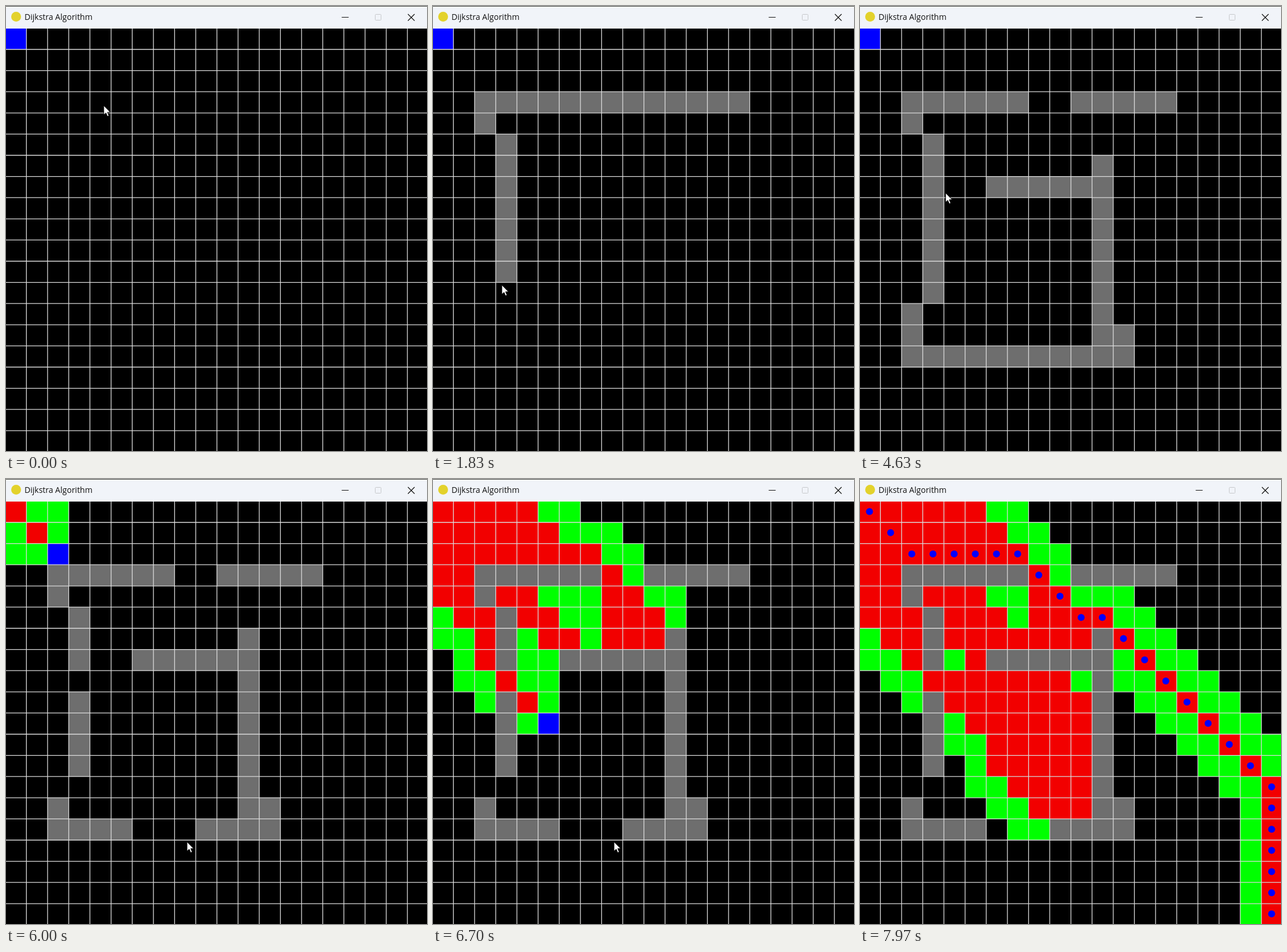
These frames come from a looping animation (728 px wide and 769 px high, 8 s). An HTML page with a canvas:

```html
<!DOCTYPE html>
<html lang="en">
<head>
<meta charset="utf-8">
<title>Dijkstra Algorithm</title>
<style>
  html, body { margin: 0; width: 100%; height: 100%; overflow: hidden; background: #000; }
  canvas, svg { position: absolute; left: 0; top: 0; display: block; }
  text { font: 14px "Open Sans", "Noto Sans", sans-serif; fill: #111; }
</style>
</head>
<body>
<canvas id="board" width="728" height="769"></canvas>
<svg width="728" height="39" viewBox="0 0 728 39" fill="none">
  <rect width="728" height="39" fill="#f1f4f9"/>
  <rect width="728" height="1" fill="#4a4a42"/>
  <circle cx="17.5" cy="18.5" r="8.5" fill="#e3d22c"/>
  <text x="32" y="24">Dijkstra Algorithm</text>
  <path d="M580.5 19.5h12" stroke="#111"/>
  <rect x="638.5" y="14.5" width="10" height="10" rx="1" stroke="#c6c8cb"/>
  <path d="M695 14l11.5 11.5M706.5 14l-11.5 11.5" stroke="#111" stroke-width="1.2"/>
</svg>
<script>
const LOOP = 8000, FRAME = 100 / 3, N = 20, CELL = 36.6, LEFT = -1.3, TOP = 38.4;
const SEARCH_START = 6000 - FRAME, STEP = FRAME / 2, INPUT_LAG = 20;
const ctx = document.getElementById('board').getContext('2d');
const colour = { wall: '#6e6e6e', open: '#00ff00', closed: '#f20000', current: '#0000ff', line: '#dcdcdc' };

// Pointer route: time, x, y, and what the button does on the way there.
const route = [
  [0, 169, 172], [550, 535, 168], [620, 535, 168],
  [1250, 90, 168, 'draw'], [1350, 92, 205, 'draw'], [1430, 122, 240],
  [1833, 119, 482, 'draw'], [1900, 122, 500, 'draw'], [1980, 90, 535],
  [2100, 88, 605, 'draw'], [2480, 455, 608, 'draw'], [2560, 455, 570, 'draw'],
  [2610, 420, 568, 'draw'], [2910, 420, 275, 'draw'], [3000, 411, 296, 'draw'],
  [3100, 405, 312, 'draw'], [3350, 235, 315, 'draw'], [3500, 235, 315],
  [3850, 310, 165], [4000, 345, 168, 'erase'], [4100, 345, 168],
  [4633, 148, 323], [4760, 127, 345], [4840, 127, 348, 'erase'],
  [5150, 92, 530], [5230, 92, 533, 'erase'], [5480, 235, 602],
  [5650, 310, 608, 'erase'], [5750, 313, 627], [7650, 313, 627], [7850, 318, 790]
];

const xOf = col => LEFT + col * CELL;
const yOf = row => TOP + row * CELL;
const cellAt = ([x, y]) => Math.floor((y - TOP) / CELL) * N + Math.floor((x - LEFT) / CELL);

function between(a, b, t) {
  const k = Math.min(1, (t - a[0]) / (b[0] - a[0]));
  return [a[1] + (b[1] - a[1]) * k, a[2] + (b[2] - a[2]) * k];
}

function pointerAt(t) {
  let i = 1;
  while (i < route.length - 1 && route[i][0] < t) i++;
  return between(route[i - 1], route[i], t);
}

function recordEdits() {
  const edits = [], walls = new Set();
  for (let i = 1; i < route.length; i++) {
    const [a, b] = [route[i - 1], route[i]];
    if (!b[3]) continue;
    const add = b[3] === 'draw';
    for (let t = a[0]; t <= b[0]; t += 4) {
      const cell = cellAt(between(a, b, t));
      if (walls.has(cell) === add) continue;
      add ? walls.add(cell) : walls.delete(cell);
      edits.push({ time: t + INPUT_LAG, cell, add });
    }
  }
  return { edits, walls };
}

// Best-first search with octile distance; ties go to the cell nearer the goal.
function search(walls) {
  const goal = N * N - 1, order = [], nodes = new Map(), open = [];
  const distance = cell => {
    const dx = N - 1 - cell % N, dy = N - 1 - Math.floor(cell / N);
    return 1000 * Math.max(dx, dy) + 414 * Math.min(dx, dy);
  };
  const visit = (cell, g, parent) => {
    let node = nodes.get(cell);
    if (!node) {
      node = { cell, g: Infinity, h: distance(cell), opened: order.length, closed: Infinity };
      nodes.set(cell, node);
      open.push(node);
    }
    if (g < node.g) Object.assign(node, { g, parent });
  };
  visit(0, 0, null);
  while (open.length) {
    let best = 0;
    open.forEach((n, i) => {
      const b = open[best], diff = n.g + n.h - b.g - b.h;
      if (diff < 0 || (diff === 0 && n.h < b.h)) best = i;
    });
    const node = open.splice(best, 1)[0];
    node.closed = order.length;
    order.push(node);
    if (node.cell === goal) break;
    const col = node.cell % N, row = Math.floor(node.cell / N);
    for (let dy = -1; dy <= 1; dy++) for (let dx = -1; dx <= 1; dx++) {
      const c = col + dx, r = row + dy, next = r * N + c;
      if ((!dx && !dy) || c < 0 || r < 0 || c >= N || r >= N || walls.has(next)) continue;
      visit(next, node.g + (dx && dy ? 1414 : 1000), node);
    }
  }
  const path = [];
  for (let n = order[order.length - 1]; n; n = n.parent) path.push(n.cell);
  return { nodes: [...nodes.values()], total: order.length, path };
}

const { edits, walls: finalWalls } = recordEdits();
const plan = search(finalWalls);

function fillCell(cell, style) {
  ctx.fillStyle = style;
  ctx.fillRect(xOf(cell % N), yOf(Math.floor(cell / N)), CELL, CELL);
}

function drawGrid() {
  ctx.strokeStyle = colour.line;
  ctx.lineWidth = 1.3;
  ctx.beginPath();
  for (let i = 1; i < N; i++) {
    ctx.moveTo(xOf(i), TOP);
    ctx.lineTo(xOf(i), 769);
    ctx.moveTo(0, yOf(i));
    ctx.lineTo(728, yOf(i));
  }
  ctx.stroke();
}

function drawDots() {
  ctx.fillStyle = colour.current;
  for (const cell of plan.path) {
    ctx.beginPath();
    ctx.arc(xOf(cell % N + .5) - .6, yOf(Math.floor(cell / N) + .5) - .5, 6, 0, 7);
    ctx.fill();
  }
}

const arrow = new Path2D('M0 0V16.2L3.8 12.8L6.4 18.7L9 17.6L6.5 11.8H11.6Z');
function drawPointer(t) {
  const [x, y] = pointerAt(t);
  ctx.save();
  ctx.translate(x, y);
  ctx.fillStyle = '#fff';
  ctx.strokeStyle = '#000';
  ctx.lineWidth = 1;
  ctx.fill(arrow);
  ctx.stroke(arrow);
  ctx.restore();
}

function draw(t) {
  ctx.fillStyle = '#000';
  ctx.fillRect(0, 0, 728, 769);
  const walls = new Set();
  for (const e of edits) {
    if (e.time > t) break;
    e.add ? walls.add(e.cell) : walls.delete(e.cell);
  }
  walls.forEach(cell => fillCell(cell, colour.wall));

  const step = Math.max(0, Math.round((t - SEARCH_START) / STEP));
  for (const n of plan.nodes) {
    if (n.closed < step) fillCell(n.cell, colour.closed);
    else if (n.closed === step) fillCell(n.cell, colour.current);
    else if (n.opened <= step) fillCell(n.cell, colour.open);
  }
  drawGrid();
  if (step >= plan.total) drawDots();
  drawPointer(t);
}

const start = performance.now();
function tick() {
  const t = (performance.now() - start) % LOOP;
  draw(Math.floor((t + 4) / FRAME) * FRAME);
  requestAnimationFrame(tick);
}
tick();
</script>
</body>
</html>
```
